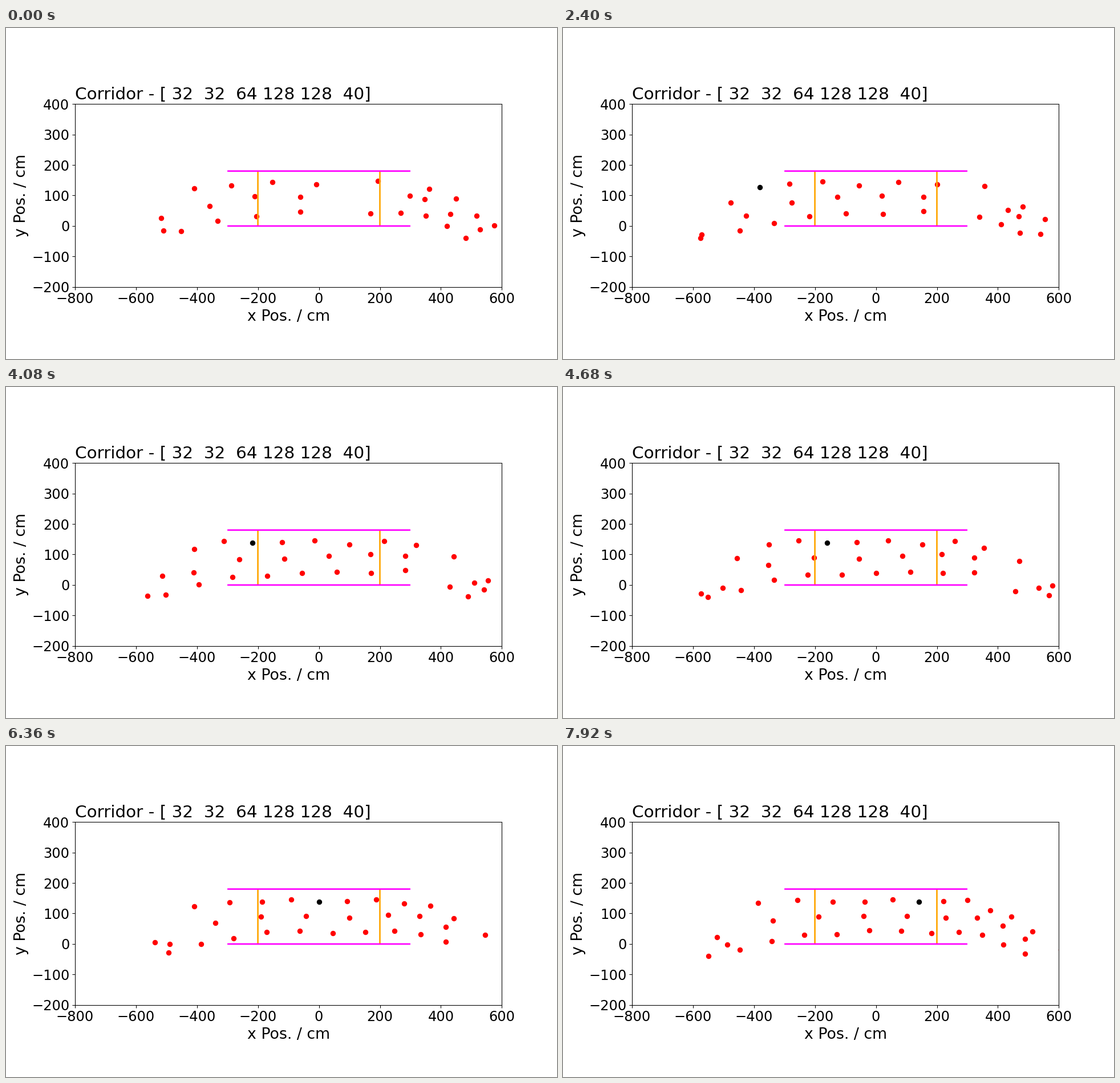
Animation of 966 by 580 pixels, one loop 8000 ms. Source, as a matplotlib script:

```python
import numpy as np
import matplotlib.pyplot as plt
from matplotlib.animation import FuncAnimation

DPI = 96.6
TICK = 40                 # ms per drawn frame
STEP = 120                # ms between two poses
LEADER = 5                # place of the black walker in the upper file

# Everyone walks at the same pace, slowing down past the corridor.
# CLOCK holds the time in s at which a walker is at WAY, counted from x = 0.
WAY = np.linspace(-760, 640, 1401)
PACE = 37.4 + 60 / (1 + np.exp((WAY - 282) / 103))
CLOCK = np.cumsum(1 / PACE)
CLOCK -= np.interp(0, WAY, CLOCK)


def queue(first, last, count, power=1.0, sway=0.0):
    """Times at which the walkers of one file pass x = 0."""
    u = np.linspace(0, 1, count)
    return first + (last - first) * u ** power + sway * np.sin(2 * np.pi * u)


def lane_y(x, height, reach):
    """Rise from the entry to the file's height, sink after the corridor."""
    rise = (height + 45) * np.exp(-((x + 615) / reach) ** 2)
    sink = 159 * (np.clip(x - 282, 0, None) / 318) ** 1.6
    return height - rise - sink


def place(t, cross, height, reach, entry):
    """Position at time t, NaN before the entry and after the exit."""
    x = np.interp(t - cross, CLOCK, WAY)
    y = lane_y(x, height, reach)
    away = (x < entry) | (y < -50)
    return np.where(away, np.nan, x), y


# Height, reach of the rise, entry x, group ahead, main stream
upper = queue(0.1, 13.3, 12, 0.97, 0.4)
LANES = (
    (139, 140, -615, queue(-2.2, -9.3, 5, 0.75), np.delete(upper, LEADER)),
    (92, 206, -590, queue(-3.65, -8.2, 4, 1.6), queue(0.65, 14.5, 10)),
    (40, 262, -555, queue(-1.9, -7.1, 5), queue(0.65, 13.6, 12, 0.9)),
)

rng = np.random.default_rng(4)
crowd = []
for height, reach, entry, ahead, stream in LANES:
    for cross in (*ahead, *stream):
        crowd.append((cross, height + rng.uniform(-9, 9), reach, entry))
crowd = np.array(crowd).T
leader = (upper[LEADER:LEADER + 1], *LANES[0][:3])

fig, ax = plt.subplots(figsize=(966 / DPI, 580 / DPI), dpi=DPI)
fig.subplots_adjust(bottom=0.109, top=0.879)
ax.set_aspect("equal")
ax.set_xlim(-800, 600)
ax.set_ylim(-200, 400)
ax.set_xticks(range(-800, 601, 200))
ax.set_yticks(range(-200, 401, 100))
ax.tick_params(labelsize=18)
ax.set_title("Corridor - [ 32  32  64 128 128  40]", loc="left", fontsize=22)
ax.set_xlabel("x Pos. / cm", fontsize=20)
ax.set_ylabel("y Pos. / cm", fontsize=20)

red, = ax.plot([], [], "o", color="red", ms=6)
black, = ax.plot([], [], "o", color="black", ms=6)
wall = dict(lw=2, solid_capstyle="butt", snap=False)
for x in (-200, 200):
    ax.plot([x, x], [0, 180], color="orange", **wall)
for y in (0, 180):
    ax.plot([-300, 300], [y, y], color="magenta", **wall)


def update(frame):
    t = frame * TICK // STEP * STEP / 1000
    red.set_data(*place(t, *crowd))
    black.set_data(*place(t, *leader))
    return red, black


anim = FuncAnimation(fig, update, frames=8000 // TICK, interval=TICK,
                     repeat=True, repeat_delay=0)
plt.show()
```
